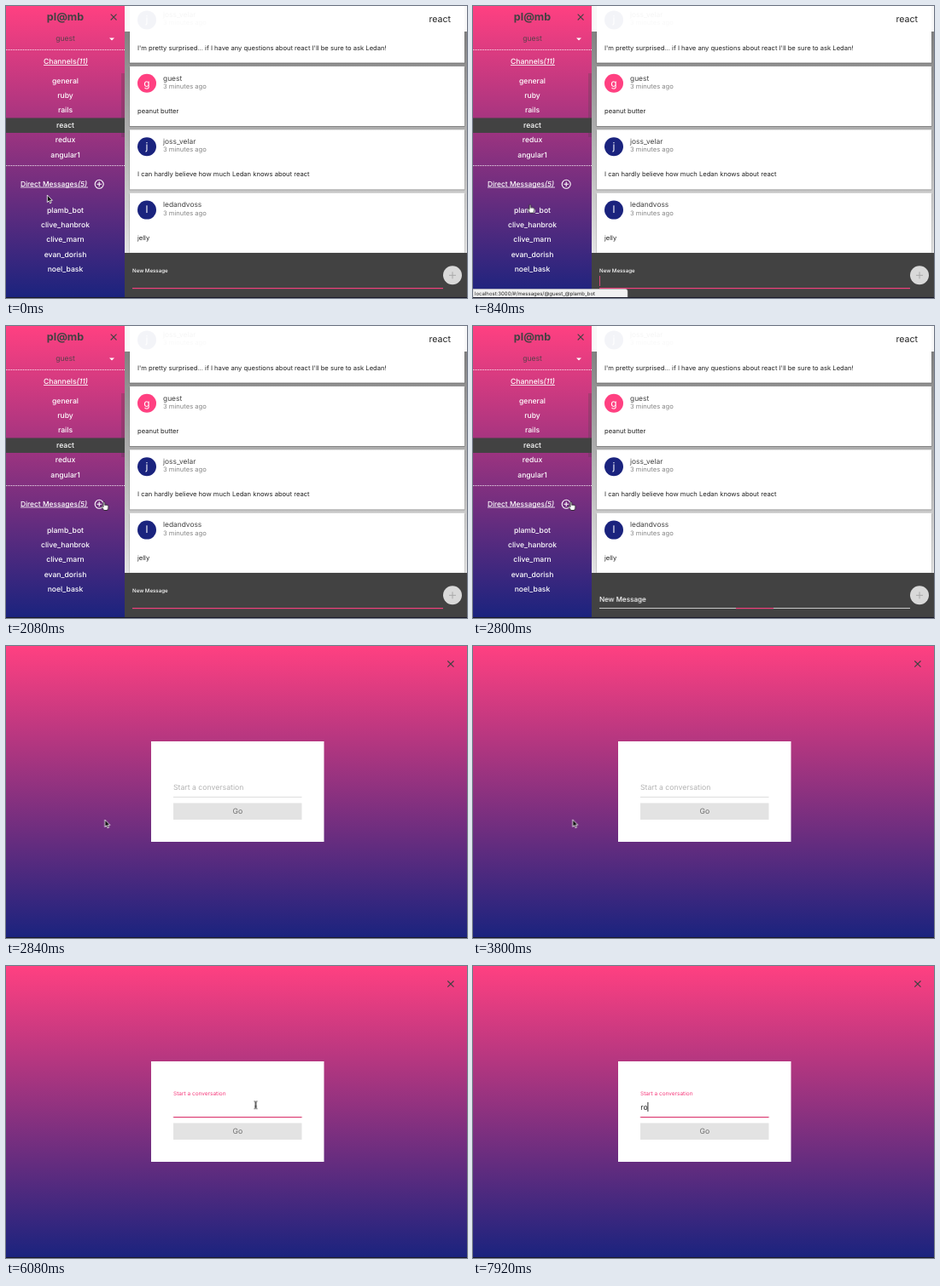
Animation, 540 px wide and 343 px high, one loop 8 s. Source, as an HTML page:

```html
<!DOCTYPE html>
<html lang="en">
<head>
<meta charset="utf-8">
<title>Chat</title>
<style>
html, body { margin: 0; width: 100%; height: 100%; overflow: hidden; }
svg { display: block; width: 100vw; height: 100vh; font-family: Inter, Roboto, sans-serif; text-rendering: geometricPrecision; }
.mid { text-anchor: middle; }
.side { font-size: 8.6px; font-weight: 500; fill: #fff; }
.name { font-size: 8.4px; fill: #424242; }
.ago { font-size: 7.6px; fill: #858585; }
.body { font-size: 7.6px; fill: #222; }
.avatar { font-size: 12px; fill: #fff; text-anchor: middle; }

.step, .tween { animation: 8s linear infinite; }
.step { animation-timing-function: step-end; }

/* scenes */
#app { animation-name: app; }
#modal { animation-name: modal; }
@keyframes app { 0% { opacity: 1 } 35.5%, 100% { opacity: 0 } }
@keyframes modal { 0% { opacity: 0 } 35.5%, 100% { opacity: 1 } }

/* message field loses focus */
#msgLabel { font-size: 8.36px; font-weight: 500; fill: #fff; animation-name: msgLabel; }
#msgBar { animation-name: msgBar; }
#msgCaret { animation-name: msgCaret; }
#status { animation-name: status; }
@keyframes msgLabel {
  0%, 26.9% { transform: translate(148px, 312.5px) scale(.735); animation-timing-function: cubic-bezier(.4, 0, .2, 1) }
  40.4%, 100% { transform: translate(148px, 325.4px) scale(1) }
}
@keyframes msgBar {
  0%, 26.9% { transform: translate(330px, 331px) scaleX(1); animation-timing-function: cubic-bezier(.4, 0, .2, 1) }
  40.4%, 100% { transform: translate(330px, 331px) scaleX(0) }
}
@keyframes msgCaret { 0% { opacity: 0 } 9% { opacity: 1 } 24%, 100% { opacity: 0 } }
@keyframes status { 0%, 7% { opacity: 0 } 9%, 22.5% { opacity: 1 } 25%, 100% { opacity: 0 } }

/* conversation field gains focus */
#talkLabel { font-size: 8.7px; animation-name: talkLabel; }
#talkBar { animation-name: talkBar; }
#talkCaret { animation-name: talkCaret; }
#typeR { animation-name: typeR; }
#typeO { animation-name: typeO; }
@keyframes talkLabel {
  0%, 58% { transform: translate(196px, 169.3px) scale(1); fill: #b3b3b3; animation-timing-function: cubic-bezier(.4, 0, .2, 1) }
  71.5%, 100% { transform: translate(196px, 152.5px) scale(.747); fill: #f5387a }
}
@keyframes talkBar {
  0%, 58% { transform: translate(271.3px, 177px) scaleX(0); animation-timing-function: cubic-bezier(.4, 0, .2, 1) }
  71.5%, 100% { transform: translate(271.3px, 177px) scaleX(1) }
}
@keyframes talkCaret {
  0% { opacity: 0; transform: translateX(196px) }
  58% { opacity: 1; transform: translateX(196px) }
  76% { opacity: 0; transform: translateX(196px) }
  91% { opacity: 1; transform: translateX(196px) }
  94.5% { opacity: 1; transform: translateX(199.3px) }
  99%, 100% { opacity: 1; transform: translateX(204.4px) }
}
@keyframes typeR { 0% { opacity: 0 } 94.5%, 100% { opacity: 1 } }
@keyframes typeO { 0% { opacity: 0 } 99%, 100% { opacity: 1 } }

/* pointer */
#mouse { animation-name: move; }
#arrow { animation-name: arrow; }
#hand { animation-name: hand; }
#beam { animation-name: beam; }
#ring { animation-name: ring; }
@keyframes move {
  0%, 4% { transform: translate(48px, 222px); animation-timing-function: ease-in }
  7.5% { transform: translate(55px, 231px) }
  14.5% { transform: translate(84px, 230px); animation-timing-function: ease-out }
  18% { transform: translate(114.5px, 205px) }
  20%, 47% { transform: translate(115.5px, 204px); animation-timing-function: ease-in-out }
  57%, 100% { transform: translate(292.5px, 163.3px) }
}
@keyframes arrow {
  0% { opacity: 1 } 7.25% { opacity: 0 } 15% { opacity: 1 } 16.5% { opacity: 0 }
  35.5% { opacity: 1 } 53%, 100% { opacity: 0 }
}
@keyframes hand {
  0% { opacity: 0 } 7.25% { opacity: 1 } 15% { opacity: 0 } 16.5% { opacity: 1 } 35.5%, 100% { opacity: 0 }
}
@keyframes beam { 0% { opacity: 0 } 53% { opacity: 1 } 95.5%, 100% { opacity: 0 } }
@keyframes ring {
  0% { opacity: 0 } 26.4% { opacity: 1 } 30.5% { opacity: 0 } 57.5% { opacity: 1 } 62%, 100% { opacity: 0 }
}
</style>
</head>
<body>
<svg viewBox="0 0 540 343" preserveAspectRatio="none">
  <defs>
    <linearGradient id="dusk" x2="0" y2="1">
      <stop stop-color="#ff4081"/><stop offset="1" stop-color="#1a237e"/>
    </linearGradient>
    <linearGradient id="fog" x2="0" y2="1">
      <stop stop-color="#777"/><stop offset="1" stop-color="#e4e4e4"/>
    </linearGradient>
  </defs>

  <g id="app" class="step">
    <rect x="139" width="401" height="291" fill="url(#fog)"/>
    <g id="cards"></g>
    <rect x="139" width="401" height="30" fill="#fff" opacity=".95"/>
    <text x="521" y="18.6" font-size="10.6" text-anchor="end" fill="#222">react</text>

    <rect x="139" y="290" width="401" height="53" fill="#424242"/>
    <rect x="148" y="331" width="364" height="1" fill="#c8c8c8"/>
    <rect id="msgBar" class="tween" x="-182" width="364" height="1.2" fill="#f0407c"/>
    <text id="msgLabel" class="tween">New Message</text>
    <rect id="msgCaret" class="step" x="148" y="317" width="1" height="12" fill="#d8487a"/>
    <circle cx="523" cy="316.3" r="11" fill="#d9d9d9"/>
    <path d="M519 316.3h8M523 312.3v8" stroke="#a8a8a8"/>

    <rect width="139" height="343" fill="url(#dusk)"/>
    <text class="mid" x="69.5" y="17.3" font-size="12.5" font-weight="700" fill="#424242">pl@mb</text>
    <path d="M122.7 9.7l6.8 6.8m0-6.8l-6.8 6.8" stroke="#424242" stroke-width="1.1"/>
    <text class="mid" x="69.5" y="41" font-size="8.6" fill="#424242" fill-opacity=".85">guest</text>
    <path d="M121 37.4h6l-3 3.2z" fill="#fff"/>
    <path d="M0 51.5h139M0 187.5h139" stroke="#fff" stroke-dasharray="1 1" opacity=".9"/>
    <rect x="135" y="79" width="4" height="75" fill="#424242" opacity=".25"/>
    <rect y="131.5" width="139" height="17.5" fill="#424242"/>
    <g class="side mid">
      <text x="70" y="68">Channels<tspan font-style="italic">(11)</tspan></text>
      <text x="56" y="211.7" font-size="8.4">Direct Messages<tspan font-style="italic">(5)</tspan></text>
      <g id="lists"></g>
    </g>
    <path d="M44 69.5h52M17 213h79" stroke="#fff" stroke-width=".8"/>
    <g fill="none" stroke="#fff" stroke-width="1.1">
      <circle cx="109.2" cy="209.3" r="5"/>
      <path d="M106.4 209.3h5.6M109.2 206.5v5.6"/>
    </g>
    <g id="status" class="tween">
      <path d="M0 332.5h178.500a2.500 2.500 0 0 1 2.500 2.500v8H0z" fill="#f1f1f1" stroke="#b5b5b5" stroke-width=".6"/>
      <text x="2" y="340" font-size="6" fill="#222">localhost:3000/#/messages/@guest_@plamb_bot</text>
    </g>
  </g>

  <g id="modal" class="step">
    <rect width="540" height="343" fill="url(#dusk)"/>
    <path d="M517.300 17.500l7.200 7.200m0-7.200l-7.200 7.200" stroke="#424242" stroke-width="1.2"/>
    <rect x="170" y="112" width="202.500" height="118" fill="#fff"/>
    <rect x="196" y="177" width="150.500" height="1" fill="#dedede"/>
    <rect id="talkBar" class="tween" x="-75.250" width="150.500" height="1.200" fill="#dc3f74"/>
    <text id="talkLabel" class="tween">Start a conversation</text>
    <g font-size="8.700" fill="#222">
      <text id="typeR" class="step" x="196.200" y="168.500">r</text>
      <text id="typeO" class="step" x="199.400" y="168.500">o</text>
    </g>
    <rect id="talkCaret" class="step" y="160" width="1" height="11" fill="#333"/>
    <rect x="196" y="184.500" width="150.500" height="19.500" fill="#e3e3e3"/>
    <text class="mid" x="271.300" y="197.300" font-size="8.700" fill="#707070">Go</text>
  </g>

  <rect y="342" width="540" height="1" fill="#1a1a2a"/>

  <g id="mouse" class="tween">
    <circle id="ring" class="step" r="9.200" fill="none" stroke="#111" stroke-width="1.200"/>
    <path id="arrow" class="step" d="M.3 0v8.600l2-1.800 1.300 3 1.500-.7-1.300-2.800h2.600z" fill="#111" stroke="#fff" stroke-width=".8"/>
    <path id="hand" class="step" d="M-1.500 3.200q.9-1 1.700 0v3.200q.7-.6 1.500 0 .8-.5 1.400.2 1-.3 1.200.7v2.700l-1 2.500h-4l-2.800-4q0-1.200 1-.8l1 .8z" fill="#fff" stroke="#111" stroke-width=".8"/>
    <path id="beam" class="step" d="M-2-4.300q2 0 2 1v6.600q0 1-2 1M2-4.300q-2 0-2 1v6.600q0 1 2 1M-1.200 1.500h2.400" fill="none" stroke="#222" stroke-width=".9"/>
  </g>
</svg>
<script>
const $ = id => document.getElementById(id);
const PINK = '#ff4081', INDIGO = '#1a237e';

const card = ([name, color, text], i) => `
  <g transform="translate(145 ${-3.4 + i * 74.4})">
    <rect x="-.5" y=".8" width="393" height="70.2" fill="#000" opacity=".22"/>
    <rect width="392" height="70" fill="#fff"/>
    <circle cx="20" cy="19.800" r="11" fill="${color}"/>
    <text class="avatar" x="20" y="23.500">${name[0]}</text>
    <text class="name" x="39" y="16.500">${name}</text>
    <text class="ago" x="39" y="25.800">3 minutes ago</text>
    <text class="body" x="9" y="55">${text}</text>
  </g>`;

const list = (names, top) => names.map((n, i) =>
  `<text x="69.500" y="${top + i * 17.4}">${n}</text>`).join('');

$('cards').innerHTML = [
  ['joss_velar', INDIGO, "I'm pretty surprised... if I have any questions about react I'll be sure to ask Ledan!"],
  ['guest', PINK, 'peanut butter'],
  ['joss_velar', INDIGO, 'I can hardly believe how much Ledan knows about react'],
  ['ledandvoss', INDIGO, 'jelly']
].map(card).join('');

$('lists').innerHTML =
  list(['general', 'ruby', 'rails', 'react', 'redux', 'angular1'], 90.5) +
  list(['plamb_bot', 'clive_hanbrok', 'clive_marn', 'evan_dorish', 'noel_bask'], 242.5);
</script>
</body>
</html>
```
